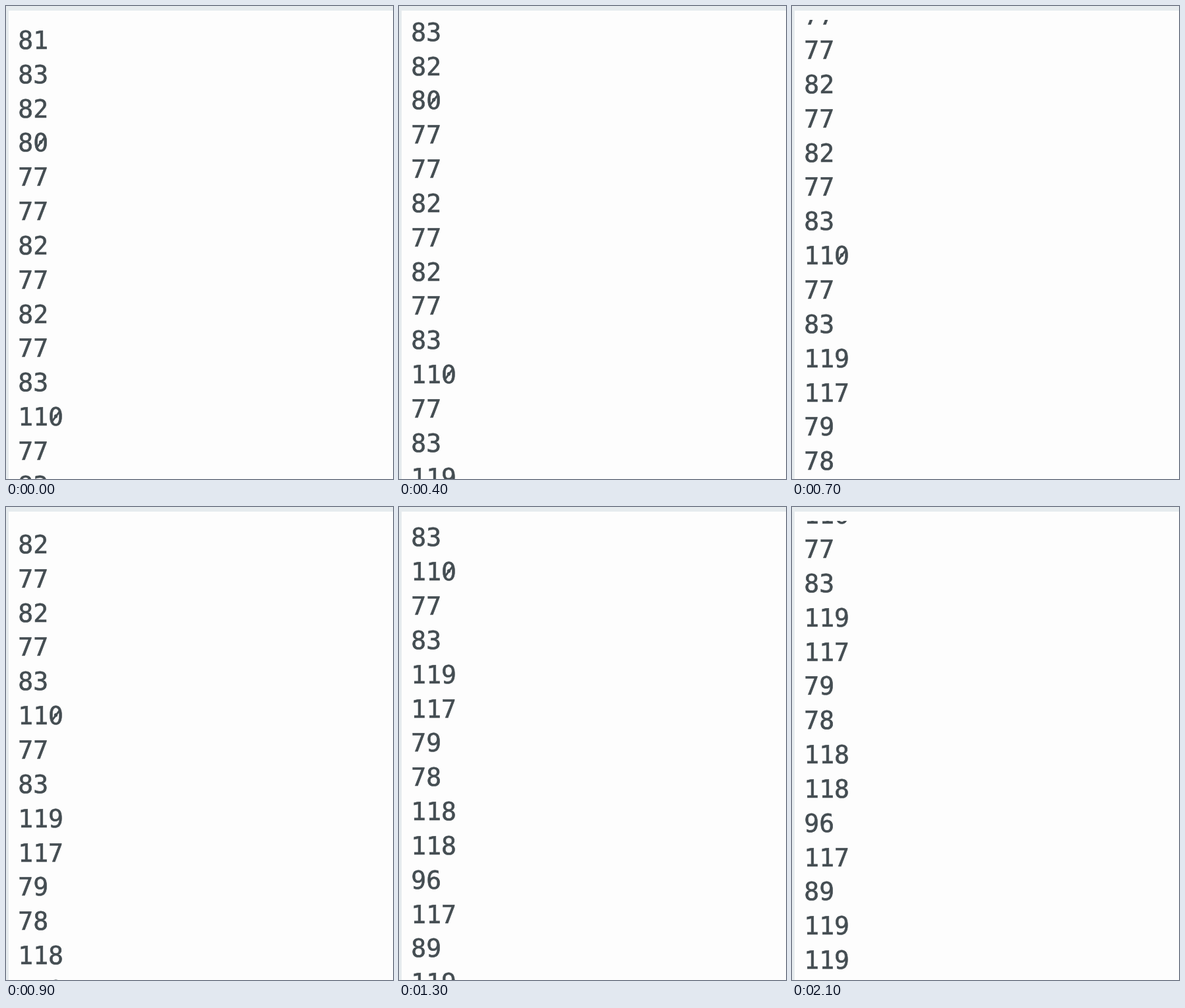
An HTML page for the animation above (2300 ms loop, 586x716 px).

```html
<!DOCTYPE html>
<html lang="en">
<head>
<meta charset="utf-8">
<title>Scrolling number list</title>
<style>
  html, body { margin: 0; width: 100%; height: 100%; overflow: hidden; background: #fdfdfd; }
  svg { display: block; }
  #list {
    font-family: "DejaVu Sans Mono", Menlo, monospace;
    text-rendering: geometricPrecision;
    fill: #444d52;
    stroke: #444d52;
    stroke-width: 0.6;
  }
  #list line { stroke-width: 3; }
</style>
</head>
<body>
<svg width="586" height="716" viewBox="0 0 586 716">
  <defs>
    <clipPath id="view"><rect y="21" width="586" height="695"/></clipPath>
  </defs>
  <rect width="586" height="716" fill="#e6ebee"/>
  <rect x="4" y="7" width="582" height="709" fill="#fdfdfd"/>
  <g clip-path="url(#view)"><g id="list"></g></g>
</svg>
<script>
const text = "81 83 82 80 77 77 82 77 82 77 83 110 77 83 119 117 79 78 118 118 96 117 89 119 119";
const LOOP = 2300, STEP = 100;
const SIZE = 38, ADVANCE = SIZE * 0.602;
const LEFT = 18.3, BASELINE = 64.9, PITCH = 51.84;

// Key points of the scroll: two flicks, each slowing down.
const keys = [
  { t: 0, y: 0 }, { t: 400, y: 64 }, { t: 700, y: 244 },
  { t: 1100, y: 372 }, { t: 1300, y: 524 }, { t: 1600, y: 610 }
];

const list = document.getElementById("list");
list.setAttribute("font-size", SIZE);

function add(tag, attributes) {
  const node = document.createElementNS("http://www.w3.org/2000/svg", tag);
  for (const key in attributes) node.setAttribute(key, attributes[key]);
  list.appendChild(node);
  return node;
}

function addSlash(x, y) {
  add("line", {
    x1: x + SIZE * 0.16, y1: y - SIZE * 0.18,
    x2: x + SIZE * 0.442, y2: y - SIZE * 0.547
  });
}

text.split(" ").forEach((value, row) => {
  const y = BASELINE + row * PITCH;
  add("text", { x: LEFT, y }).textContent = value;
  [...value].forEach((digit, column) => {
    if (digit === "0") addSlash(LEFT + column * ADVANCE, y);
  });
});

const slope = i => (keys[i + 1].y - keys[i].y) / (keys[i + 1].t - keys[i].t);

// Harmonic mean of the neighbouring slopes; at rest at both ends.
function speed(i) {
  if (i === 0 || i === keys.length - 1) return 0;
  const before = slope(i - 1), after = slope(i);
  return 2 * before * after / (before + after);
}

function scrollAt(time) {
  const next = keys.findIndex(key => key.t > time);
  if (next < 0) return keys[keys.length - 1].y;
  const a = keys[next - 1], b = keys[next];
  const span = b.t - a.t, u = (time - a.t) / span, v = 1 - u;
  return a.y * v * v * (1 + 2 * u) + b.y * u * u * (1 + 2 * v)
    + span * u * v * (speed(next - 1) * v - speed(next) * u);
}

function draw(time) {
  const stepped = Math.floor((time % LOOP) / STEP) * STEP;
  list.setAttribute("transform", `translate(0 ${-Math.round(scrollAt(stepped))})`);
}

const start = performance.now();
function tick() {
  draw(performance.now() - start);
  requestAnimationFrame(tick);
}
tick();
</script>
</body>
</html>
```
